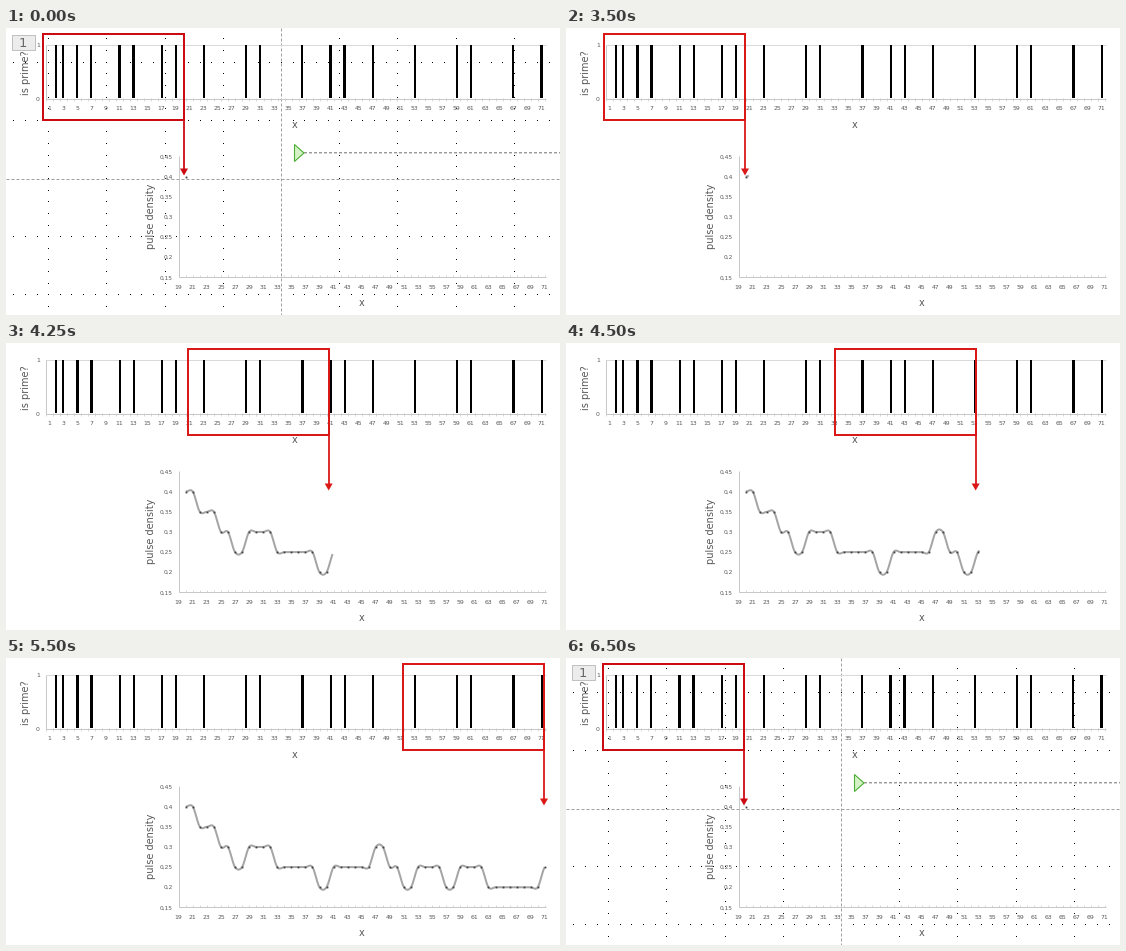
These frames come from a looping animation (554x287 px, 7.25 s). A matplotlib script:

```python
import numpy as np
import matplotlib.pyplot as plt
from matplotlib.animation import FuncAnimation
from matplotlib.collections import LineCollection
from matplotlib.patches import Polygon, Rectangle

W, H, DPI = 554, 287, 100
TICK = 250
FRAMES = 29
PLAY_FROM, PLAY_TO = 3500, 6250
MOVE_START, MOVE_TIME, TRAVEL = 3551, 1603, 359
STEP = 7.0333
PX = 72 / DPI
INK, AXIS = "#595959", "#c8c8c8"
NUM, TITLE = 6.1, 9.8

fig = plt.figure(figsize=(W / DPI, H / DPI), dpi=DPI, facecolor="white")
ax = fig.add_axes([0, 0, 1, 1])
ax.set_xlim(0, W)
ax.set_ylim(H, 0)
ax.axis("off")


def label(x, y, s, size, color=INK, ha="center", va="center_baseline", **kw):
    return ax.text(x, y, s, fontsize=size * PX, color=color, ha=ha, va=va,
                   family="DejaVu Sans", **kw)


def line(xs, ys, color=AXIS, width=1, z=2, **kw):
    return ax.plot(xs, ys, color=color, lw=width * PX, zorder=z,
                   solid_capstyle="butt", dash_capstyle="butt", **kw)[0]


def ticks(xs, y0, y1):
    segs = [[(x, y0), (x, y1)] for x in xs]
    ax.add_collection(LineCollection(segs, colors=AXIS, linewidths=0.7 * PX, zorder=2))


def is_prime(n):
    return n > 1 and all(n % d for d in range(2, int(n ** 0.5) + 1))


primes = [n for n in range(2, 72) if is_prime(n)]


# Upper chart: prime pulses
def top_x(n):
    return 43 + (n - 1) * STEP


def make_bars(offset):
    bars = []
    for n in primes:
        a = offset + STEP * n
        left, right = round(a), round(a + 2.2)
        bars.append(ax.add_patch(Rectangle((left, 17), right - left, 53,
                                           fc="black", lw=0, zorder=4)))
    return bars


edit_bars = make_bars(35.0)
play_bars = make_bars(35.18)
line([39.5, 540], [16.5, 16.5], "#d9d9d9")
line([39.5, 540], [70.5, 70.5])
line([39.5, 39.5], [16.5, 70.5])
ticks(39.5 + STEP * np.arange(72), 70, 72.5)
label(34, 17, "1", NUM, ha="right")
label(34, 71, "0", NUM, ha="right")
for n in range(1, 72, 2):
    label(top_x(n), 79.7, str(n), NUM)
label(19.7, 44.5, "is prime?", TITLE, rotation=90, va="center")
label(289, 96, "x", TITLE)


# Lower chart: share of primes among the last 20 numbers
def low_x(n):
    return 172.7 + (n - 19) * 7.04


def low_y(v):
    return 128.5 + (0.45 - v) * 403


line([172.5, 172.5], [128, 248.5])
line([172.5, 540], [248.5, 248.5])
ticks(low_x(np.arange(19, 72)), 246.5, 249)
for k in range(7):
    v = 0.45 - 0.05 * k
    label(166.5, low_y(v), f"{v:.2f}".rstrip("0").replace(".", ","), NUM - 0.2, ha="right")
for n in range(19, 72, 2):
    label(low_x(n), 258.7, str(n), NUM)
label(144.5, 188.7, "pulse density", TITLE, rotation=90, va="center")
label(355.5, 274.3, "x", TITLE)

ns = np.arange(20, 72)
mark_x = low_x(ns)
mark_y = low_y(np.array([sum(n - 20 < p <= n for p in primes) / 20 for n in ns]))


def smooth(y, steps=14):
    """Catmull-Rom values through evenly spaced points."""
    p = np.concatenate([y[:1], y, y[-1:]])
    u = np.arange(steps) / steps
    parts = []
    for a, b, c, d in zip(p, p[1:], p[2:], p[3:]):
        parts.append(b + 0.5 * u * (c - a + u * (2 * a - 5 * b + 4 * c - d
                                                + u * (3 * (b - c) + d - a))))
    return np.append(np.concatenate(parts), y[-1])


curve_y = smooth(mark_y)
curve_x = np.linspace(mark_x[0], mark_x[-1], len(curve_y))
curve = line([], [], "#a5a5a5", 2, 5)
marks, = ax.plot([], [], "s", ms=1.8 * PX, mfc="#404040", mew=0, zorder=6)

# Sliding window with its pointer
window = ax.add_patch(Rectangle((38, 6), 141, 86, fill=False, lw=2 * PX,
                                joinstyle="miter", zorder=8))
stem = line([], [], "red", 1.8, 8)
head = ax.add_patch(Polygon([(0, 0)] * 3, lw=0, zorder=8))

# Editor view: dot grid and guides around one centre, play marker, order tag
CELL = 58.2
CX, CY = 274, 150
cols = CX + CELL / 5 * np.arange(-23, 24)
rows = CY + CELL / 5 * np.arange(-12, 12)
dots = [(CX + CELL * k, y) for k in range(-4, 5) if k for y in rows]
dots += [(x, CY + CELL * k) for k in (-2, -1, 1, 2) for x in cols]
dots = np.round(dots) + 0.5
editor = [
    ax.plot(dots[:, 0], dots[:, 1], ",", color="black", zorder=1)[0],
    line([CX + 0.5] * 2, [0, H], "#a0a0a0", 1, 1, dashes=(3, 2)),
    line([0, W], [CY + 0.5] * 2, "#a0a0a0", 1, 1, dashes=(3, 2)),
    line([298, W], [124.8, 124.8], "#707070", 1, 3, dashes=(3, 2), snap=False),
    ax.add_patch(Polygon([(288.5, 116.5), (298, 125), (288.5, 133.5)],
                         fc="#d4f2c6", ec="#4bae32", lw=1.1 * PX, zorder=4)),
    ax.add_patch(Rectangle((5.5, 6.5), 23, 15, fc="#ececec", ec="#c0c0c0",
                           lw=1 * PX, zorder=7)),
    label(17, 14, "1", 13, "#686868", zorder=9),
]


def draw(i):
    t = i * TICK
    play = PLAY_FROM <= t < PLAY_TO
    for a in editor + edit_bars:
        a.set_visible(not play)
    for a in play_bars:
        a.set_visible(play)

    s = np.clip((t - MOVE_START) / MOVE_TIME, 0, 1) if play else 0
    left = (38 if play else 37) + TRAVEL * (1 - np.cos(np.pi * s)) / 2
    right = left + 141
    red = "#da1818" if play else "#cc0a12"
    window.set_x(left)
    window.set_edgecolor(red)
    stem.set_data([right, right], [92, 142])
    stem.set_color(red)
    head.set_xy([(right - 4, 140.5), (right + 4, 140.5), (right, 147.5)])
    head.set_facecolor(red)

    edge = right + (4 if play else 2)
    seen = curve_x <= edge
    curve.set_data(curve_x[seen], curve_y[seen])
    seen = mark_x <= edge
    marks.set_data(mark_x[seen], mark_y[seen])
    return []


anim = FuncAnimation(fig, draw, frames=FRAMES, interval=TICK, repeat=True, blit=False)
plt.show()
```
